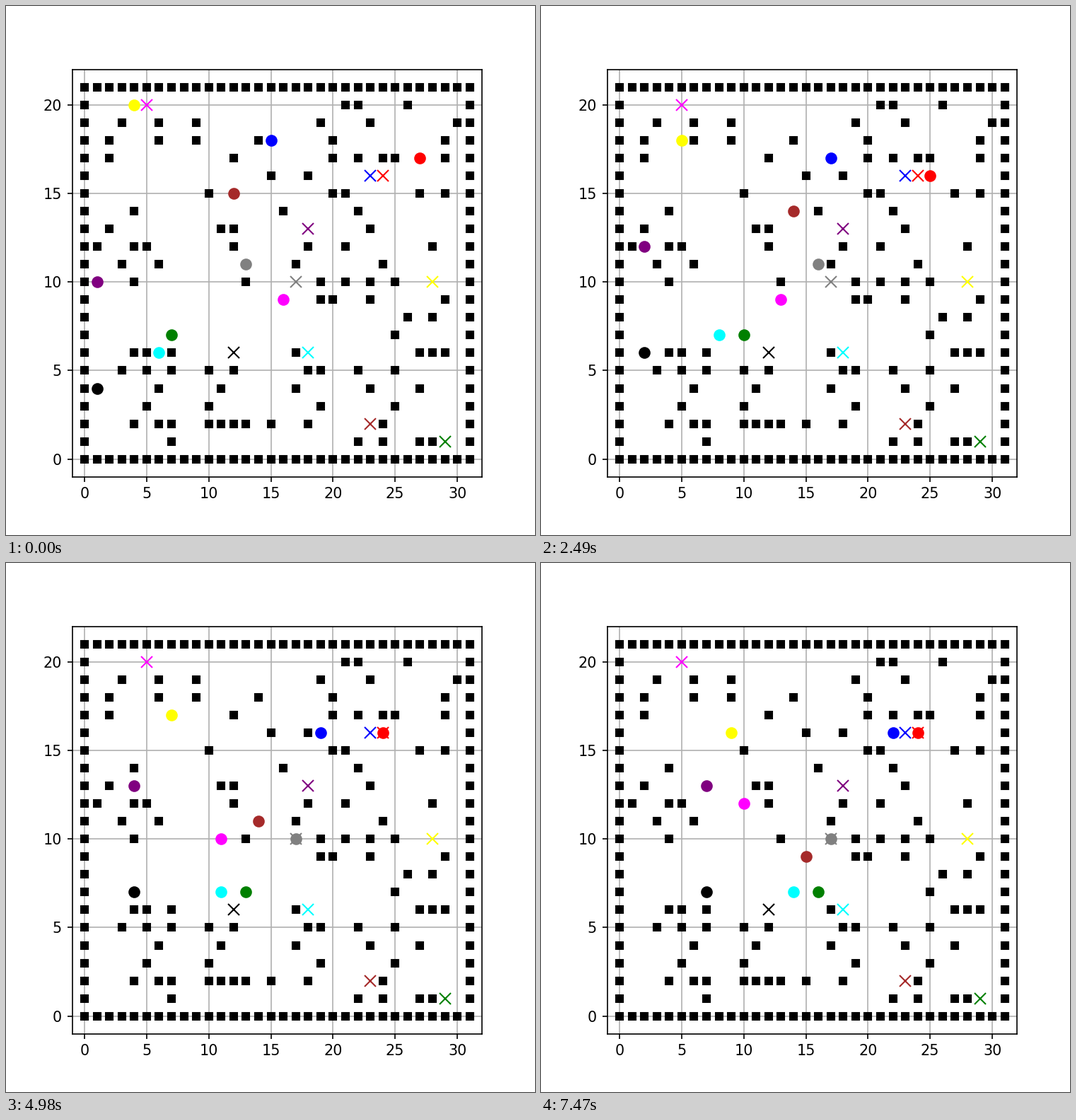
Write a matplotlib script that moves like this. It is 748x748 px and loops after 8 s.

```python
import matplotlib.pyplot as plt
from matplotlib.animation import FuncAnimation

SIZE, DPI = 748, 149.6
LOOP, TICK, HOLD = 8000, 40, 830  # ms
WIDTH, HEIGHT = 31, 21

# Obstacle columns for each row inside the border
BLOCKS = {
    20: [21, 22, 26],
    19: [3, 6, 9, 19, 23, 30],
    18: [2, 6, 9, 14, 20, 29],
    17: [2, 12, 20, 22, 24, 25, 29],
    16: [15, 18],
    15: [10, 20, 21, 27, 29],
    14: [4, 16, 22],
    13: [2, 11, 12, 23],
    12: [1, 4, 5, 12, 18, 21, 28],
    11: [3, 6, 17, 24],
    10: [4, 13, 19, 21, 23, 25],
    9: [19, 20, 23, 29],
    8: [26, 28],
    7: [25],
    6: [4, 5, 7, 17, 27, 28, 29],
    5: [3, 5, 7, 10, 12, 18, 19, 22, 25],
    4: [6, 11, 17, 23, 27],
    3: [5, 10, 19, 25],
    2: [4, 6, 7, 10, 11, 12, 13, 15, 18, 24],
    1: [7, 22, 24, 27, 28],
}

# colour: start, goal, moves (one letter per step, "." waits)
AGENTS = {
    "black": ((1, 4), (12, 6), "RUURURRRR"),
    "cyan": ((6, 6), (18, 6), "URRRRRRRR"),
    "green": ((7, 7), (29, 1), "RRRRRRRRR"),
    "purple": ((1, 10), (18, 13), "RUURURRRR"),
    "gray": ((13, 11), (17, 10), "RRRDR...."),
    "magenta": ((16, 9), (5, 20), "LLLLULLUU"),
    "brown": ((12, 15), (23, 2), "RDRDDDDDR"),
    "red": ((27, 17), (24, 16), "LDLL....."),
    "blue": ((15, 18), (23, 16), "RDRRRDRRR"),
    "yellow": ((4, 20), (28, 10), "RDDDRRRDR"),
}
STEP = {"R": (1, 0), "L": (-1, 0), "U": (0, 1), "D": (0, -1), ".": (0, 0)}


def walk(start, moves):
    path = [start]
    for move in moves:
        (x, y), (dx, dy) = path[-1], STEP[move]
        path.append((x + dx, y + dy))
    return path


def obstacles():
    cells = [(x, y) for y, row in BLOCKS.items() for x in row]
    cells += [(x, y) for x in range(WIDTH + 1) for y in (0, HEIGHT)]
    cells += [(x, y) for y in range(1, HEIGHT) for x in (0, WIDTH)]
    return zip(*cells)


fig, ax = plt.subplots(figsize=(SIZE / DPI, SIZE / DPI), dpi=DPI)
ax.set_xlim(-1, WIDTH + 1)
ax.set_ylim(-1, HEIGHT + 1)
ax.set_xticks(range(0, WIDTH, 5))
ax.set_yticks(range(0, HEIGHT, 5))
ax.grid(True)
ax.plot(*obstacles(), "ks", markersize=5)

dots, paths = [], []
for color, (start, goal, moves) in AGENTS.items():
    ax.plot(*goal, "x", color=color, markersize=8)
    dots += ax.plot(*start, "o", color=color, markersize=7, zorder=3)
    paths.append(walk(start, moves))


def update(frame):
    step = (frame * TICK + TICK - 10) // HOLD
    for dot, path in zip(dots, paths):
        x, y = path[step]
        dot.set_data([x], [y])
    return dots


anim = FuncAnimation(fig, update, frames=LOOP // TICK, interval=TICK,
                     repeat=True, repeat_delay=0)
plt.show()
```
